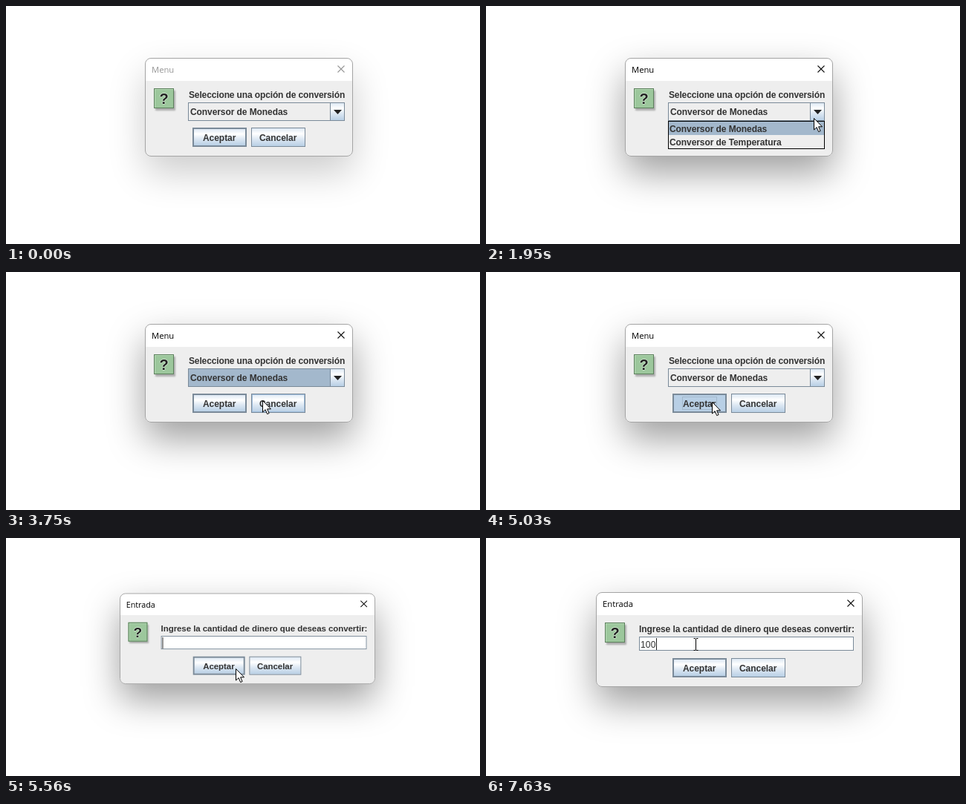
An HTML page that plays this animation: 638x321 px, repeating every 8 s.

```html
<!DOCTYPE html>
<html lang="es">
<head>
<meta charset="utf-8">
<title>Conversor</title>
<style>
html, body { margin: 0; width: 100%; height: 100%; overflow: hidden; background: #fff; }
#stage { position: relative; width: 638px; height: 321px; overflow: hidden; cursor: default; }
#stage div { position: absolute; box-sizing: border-box; }
.win { border: 1px solid #a4a4a4; border-radius: 8px; background: linear-gradient(#fff 30px, #eee 30px); }
.text { font: bold 12px/14px "Liberation Sans", Arial, sans-serif; color: #333; white-space: pre; }
.plain { font-weight: normal; }
.title { font: 11.25px/14px "Open Sans", "Noto Sans", sans-serif; color: #000; }
.close { width: 10px; height: 10px; color: #111; }
.close svg { position: absolute; left: 0; top: 0; }
.idle .title, .idle .close { color: #969696; }
.icon { width: 27px; height: 27px; border: 1px solid #5c805c; background: #9cc79c; box-shadow: inset 1px 1px #b4d8b4, 2px 3px 2px rgba(0,0,0,.28);
  font: bold 20px/26px "Liberation Sans", Arial, sans-serif; color: #222; text-align: center; text-shadow: 1px 0 #cde6cd, -1px 0 #cde6cd, 0 1px #cde6cd, 0 -1px #cde6cd; }
.btn { border: 1px solid #7a8a99; background: linear-gradient(#dde8f3, #fff 30%, #dde8f3 60%, #b8cfe5); }
.main { border-width: 2px; }
.btn.over { box-shadow: inset 0 0 0 1px #9fbddc; }
.btn.down { background: #b8cfe5; }
.focus { border: 1px solid #a3b8cc; }
.combo { border: 1px solid #7a8a99; background: #eee; }
.combo.on { background: #a3b8cc; }
.list { border: 1px solid #000; background: #eee; }
.field { border: 1px solid #7a8a99; background: #fff; }
.caret { width: 1px; height: 16px; background: #222; }
#cursor { position: absolute; left: 0; top: 0; overflow: visible; }
</style>
</head>
<body>
<div id="stage"></div>
<script>
const LOOP = 8000;
const stage = document.getElementById('stage');
const show = (el, on) => { el.style.display = on ? '' : 'none'; };

function box(parent, cls, x, y, w, h) {
  const el = document.createElement('div');
  el.className = cls;
  el.style.left = x + 'px';
  el.style.top = y + 'px';
  if (w) { el.style.width = w + 'px'; el.style.height = h + 'px'; }
  parent.appendChild(el);
  return el;
}

function label(parent, text, x, base, spacing = 0, cls = 'text') {
  const el = box(parent, cls, x, base - 11);
  el.textContent = text;
  el.style.letterSpacing = spacing + 'px';
  return el;
}

// Children are placed in stage coordinates inside an offset layer.
function dialog(title, x, y, w, h, origin) {
  const win = box(stage, 'win', x, y, w, h);
  win.style.transformOrigin = origin;
  const root = box(win, 'root', -x - 1, -y - 1);
  label(root, title, x + 9, y + 20, 0, 'title');
  const close = box(root, 'close', x + w - 21, y + 10, 10, 10);
  close.innerHTML = '<svg width="10" height="10"><path d="M.5 .5l9 9M9.5 .5l-9 9" stroke="currentColor" stroke-width="1.1"/></svg>';
  return { win, root, close, x, y, w, h };
}

function button(parent, text, x, y, cls, textX) {
  const el = box(parent, 'btn ' + cls, x, y, 73, 26);
  label(parent, text, textX, y + 18, -0.05);
  return el;
}

function icon(parent, x, y) {
  box(parent, 'icon', x, y, 27, 27).textContent = '?';
}

const menu = dialog('Menu', 187, 70, 280, 133, '70px 22px');
icon(menu.root, 199, 111);
label(menu.root, 'Seleccione una opción de conversión', 246, 124, -0.13);
const combo = box(menu.root, 'combo', 245, 130, 211, 25);
label(menu.root, 'Conversor de Monedas', 248, 147, -0.08);
const drop = box(menu.root, 'btn', 436, 130, 20, 25);
drop.innerHTML = '<svg width="18" height="23" style="position:absolute;left:0;top:0"><path d="M4 9h11l-5.5 6z" fill="#222"/></svg>';
const accept = button(menu.root, 'Aceptar', 251, 164, 'main', 265);
const focus = box(menu.root, 'focus', 264, 168, 47, 18);
const cancel = button(menu.root, 'Cancelar', 330, 164, '', 341);
const list = box(menu.root, 'list', 245, 155, 211, 38);
box(list, 'combo on', 0, 0, 209, 18).style.border = 0;
label(list, 'Conversor de Monedas', 1, 14, -0.08);
label(list, 'Conversor de Temperatura', 1, 32, -0.08);

const entry = dialog('Entrada', 148, 73, 359, 128, '120px 35px');
icon(entry.root, 160, 114);
label(entry.root, 'Ingrese la cantidad de dinero que deseas convertir:', 206, 127, -0.07);
box(entry.root, 'field', 206, 133, 289, 19);
const typed = label(entry.root, '', 208, 148, 0.2, 'text plain');
const caret = box(entry.root, 'caret', 208, 135);
button(entry.root, 'Aceptar', 251, 162, 'main', 265);
button(entry.root, 'Cancelar', 330, 162, '', 341);

stage.insertAdjacentHTML('beforeend', `<svg id="cursor" width="1" height="1" shape-rendering="auto">
<path d="M.5 .5V16l3.6-3.4 2.6 6 2.4-1.1-2.5-5.7h4.9z" fill="#fff" stroke="#000"/>
<path d="M.5 -9V11M-9 .5H11" fill="none" stroke="#000" stroke-dasharray="1 1"/>
<path d="M-2.5 -7.5H0M1 -7.5H3.5M.5 -7V8M-2.5 8.5H0M1 8.5H3.5" fill="none" stroke="#000"/>
</svg>`);
const cursor = document.getElementById('cursor');
const [arrow, cross, beam] = cursor.children;

// time, x, y
const path = [
  [320, 589, 312], [1080, 455, 164], [1150, 455, 164], [1350, 441, 146], [1570, 441, 146],
  [1900, 441, 151], [2280, 441, 151], [2350, 441, 146], [2760, 441, 146], [2980, 431, 164],
  [3290, 418, 171], [3550, 418, 171], [3750, 345, 173], [4240, 304, 175], [5250, 304, 175],
  [5560, 309, 176], [5830, 312, 177], [6090, 312, 177], [6700, 282, 143]
];
// time, scale, opacity
const closing = [[5120, 1, 1], [5200, 0.979, 0.55], [5290, 0.95, 0]];
const opening = [[5430, 0.9, 0], [5560, 0.958, 1], [5830, 1, 1]];
const shade = [[1570, 0.2], [1850, 0.38]];

const linear = s => s;
const easeOut = s => s * (2 - s);

function sample(keys, t, ease = linear) {
  const last = keys[keys.length - 1];
  if (t <= keys[0][0]) return keys[0].slice(1);
  if (t >= last[0]) return last.slice(1);
  const i = keys.findIndex(k => k[0] > t);
  const a = keys[i - 1], b = keys[i];
  const s = ease((t - a[0]) / (b[0] - a[0]));
  return a.slice(1).map((v, n) => v + (b[n + 1] - v) * s);
}

function pose(dlg, [scale, opacity], alpha) {
  show(dlg.win, opacity > 0);
  dlg.win.style.transform = scale === 1 ? 'none' : `scale(${scale})`;
  dlg.win.style.opacity = opacity;
  dlg.win.style.boxShadow = `0 22px 50px rgba(0,0,0,${alpha})`;
}

const inside = (x, y, l, t, w, h) => x >= l && x < l + w && y >= t && y < t + h;
const over = (d, x, y) => inside(x, y, d.x, d.y, d.w, d.h);

function render(t) {
  const [x, y] = sample(path, t, easeOut).map(Math.round);

  pose(menu, sample(closing, t), sample(shade, t)[0]);
  menu.win.classList.toggle('idle', t < 1570);
  show(menu.close, t < 5120);
  show(list, t >= 1700 && t < 3080);
  combo.classList.toggle('on', t >= 3080 && t < 5030);
  cancel.classList.toggle('over', t > 3290 && inside(x, y, 330, 164, 73, 26));
  accept.classList.toggle('down', t >= 5030);
  show(focus, t >= 5030);

  pose(entry, sample(opening, t), 0.38);
  const text = '100'.slice(0, [7300, 7430, 7630].filter(k => t >= k).length);
  typed.textContent = text;
  caret.style.left = 208 + 7 * text.length + 'px';
  show(caret, text || t < 6100 || (t >= 6600 && t < 7100));

  const live = (t < 5120 && over(menu, x, y)) || (t >= 5430 && over(entry, x, y));
  const typing = t >= 6090 && inside(x, y, 206, 133, 289, 19);
  show(cursor, t >= 320);
  show(cross, !live);
  show(beam, live && typing);
  show(arrow, live && !typing);
  cursor.style.transform = `translate(${x}px,${y}px)`;
}

const start = performance.now();
function tick() {
  render((performance.now() - start) % LOOP);
  requestAnimationFrame(tick);
}
render(0);
requestAnimationFrame(tick);
</script>
</body>
</html>
```
